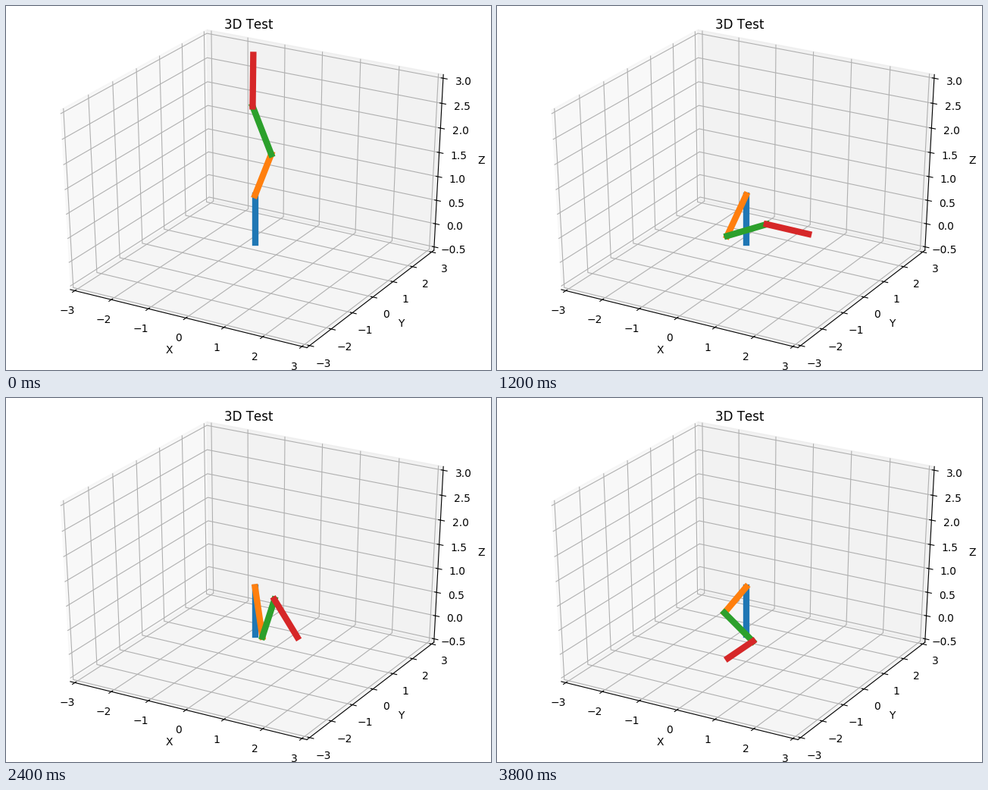
A matplotlib script that plays this animation: 640 px wide and 480 px high, repeating every 4 s.

```python
import numpy as np
import matplotlib.pyplot as plt
from matplotlib.animation import FuncAnimation

FRAMES, STEP = 20, 200
plt.rcParams["text.kerning_factor"] = 6  # loose letter spacing

# A few key poses: step -> tilt of each upper link from vertical, in degrees
POSES = {
    0: (25, -29, 1),
    2: (96, 125, 89),
    6: (207, 71, 97),
    10: (136, 216, 64),
    12: (164, 386, 123),
    16: (121, 270, 257),
    19: (225, 112, 235),
}
TILTS = np.radians(list(POSES.values())).T


def joints(i):
    """Points of the arm, from the base to the tip, as a 5 x 3 array."""
    yaw = np.sin(0.46 * i + 0.0026 * i**2)  # the base swings one radian each way
    links = [(0, 0, 0), (0, 0, 1)]
    for keys in TILTS:
        t = np.interp(i, list(POSES), keys)
        links.append((np.sin(t) * np.cos(yaw), np.sin(t) * np.sin(yaw), np.cos(t)))
    return np.cumsum(links, axis=0)


def padded(lo, hi):
    pad = (hi - lo) / 48
    return lo - pad, hi + pad


fig = plt.figure(figsize=(6.4, 4.8), dpi=100, facecolor="white")
ax = fig.add_axes([0, 0, 1, 1], projection="3d")
ax.apply_aspect = lambda position=None: None  # fill the whole figure
ax.set_box_aspect((1, 1, 1), zoom=np.sqrt(3) / 1.8294640721620434)
ax.view_init(elev=30, azim=-60)

lines = [ax.plot([0, 0], [0, 0], [0, 1], lw=6)[0] for _ in range(4)]

ax.set_xticks(range(-3, 4))
ax.set_yticks(range(-3, 4))
ax.set_zticks(np.arange(-0.5, 3.1, 0.5))
ax.set_xlim(padded(-3, 3))
ax.set_ylim(padded(-3, 3))
ax.set_zlim(padded(-0.5, 3))
ax.set(xlabel="X", ylabel="Y", zlabel="Z")
fig.text(0.5, 0.9374, "3D Test", fontsize=12, ha="center", va="baseline")


def draw(i):
    pts = joints(i)
    for line, a, b in zip(lines, pts, pts[1:]):
        line.set_data_3d(*np.array([a, b]).T)
    return lines


anim = FuncAnimation(fig, draw, frames=FRAMES, interval=STEP,
                     repeat=True, repeat_delay=0, blit=False)
plt.show()
```
